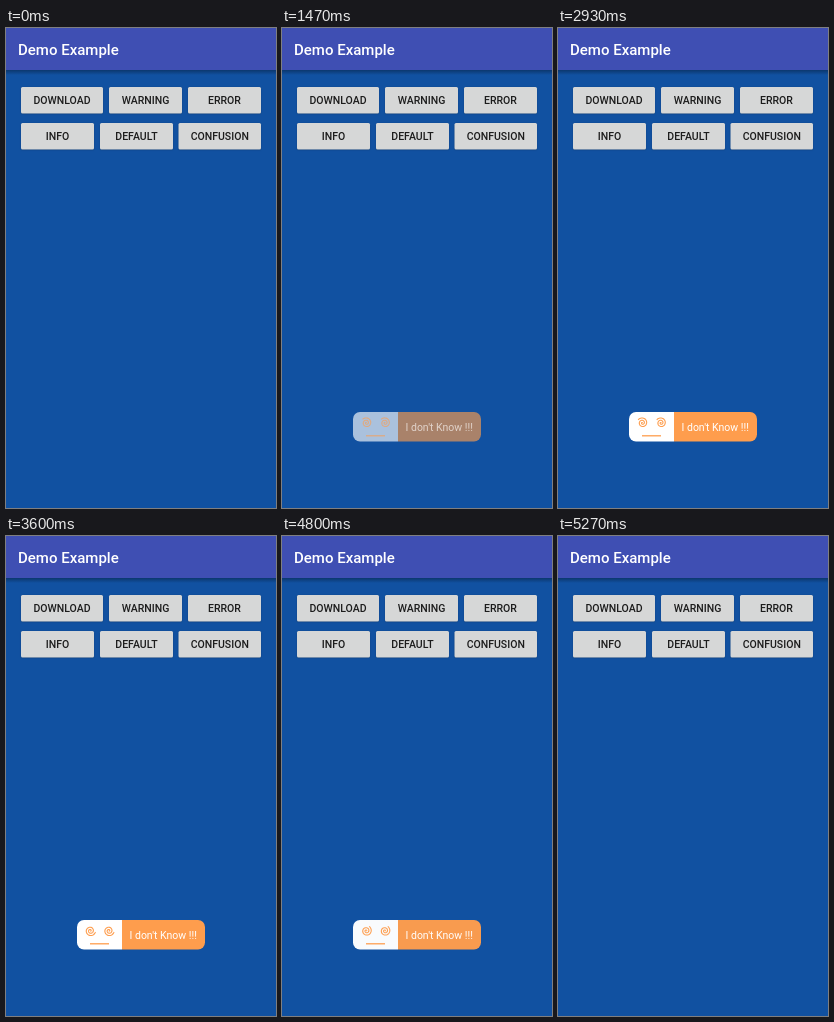
Write an HTML page with a canvas that moves like this. It is 270 px wide and 480 px high and loops after 6540 ms.

```html
<!DOCTYPE html>
<html lang="en">
<head>
<meta charset="utf-8">
<title>Demo Example</title>
<style>
  html, body { margin: 0; width: 100%; height: 100%; overflow: hidden; background: #1151a1; }
  canvas { display: block; width: 100vw; height: 100vh; }
</style>
</head>
<body>
<canvas id="stage" width="270" height="480"></canvas>
<script>
const ctx = document.getElementById('stage').getContext('2d');
const LOOP = 6540;
const STEP = 200 / 3;
const ORANGE = '#fe9d4d';
const FONT = 'Roboto, sans-serif';

const BUTTONS = [
  ['DOWNLOAD', 15, 59, 82],
  ['WARNING', 103, 59, 73],
  ['ERROR', 182, 59, 73],
  ['INFO', 15, 95, 73],
  ['DEFAULT', 94, 95, 73],
  ['CONFUSION', 172.5, 95, 82.5]
];
const BUTTON_HEIGHT = 26.5;

const clamp = v => Math.max(0, Math.min(1, v));
const progress = (t, start, duration) => clamp((t - start) / duration);

function roundRect(x, y, w, h, r) {
  ctx.beginPath();
  ctx.roundRect(x, y, w, h, r);
}

function label(text, x, y, size, weight, color, align = 'left') {
  ctx.font = `${weight} ${size}px ${FONT}`;
  ctx.fillStyle = color;
  ctx.textAlign = align;
  ctx.fillText(text, x, y);
}

function drawBackground() {
  ctx.fillStyle = '#1151a1';
  ctx.fillRect(0, 0, 270, 480);
  const shadow = ctx.createLinearGradient(0, 42, 0, 47);
  shadow.addColorStop(0, 'rgba(0,0,0,.32)');
  shadow.addColorStop(1, 'rgba(0,0,0,0)');
  ctx.fillStyle = shadow;
  ctx.fillRect(0, 42, 270, 5);
  ctx.fillStyle = '#3f4fb3';
  ctx.fillRect(0, 0, 270, 42);
  label('Demo Example', 12, 27, 15, 500, '#fff');
}

function drawButton([text, x, y, w], press) {
  ctx.save();
  ctx.shadowColor = 'rgba(0,0,0,.3)';
  ctx.shadowBlur = 1.5 + press.opacity;
  ctx.shadowOffsetY = 0.5 + press.opacity * 0.5;
  ctx.fillStyle = '#d6d7d7';
  roundRect(x, y, w, BUTTON_HEIGHT, 1.5);
  ctx.fill();
  ctx.restore();

  if (press.opacity > 0) {
    ctx.save();
    roundRect(x, y, w, BUTTON_HEIGHT, 1.5);
    ctx.clip();
    ctx.fillStyle = `rgba(0,0,0,${0.12 * press.opacity})`;
    ctx.beginPath();
    ctx.arc(x + w / 2, y + BUTTON_HEIGHT / 2, 44 * press.spread, 0, Math.PI * 2);
    ctx.fill();
    ctx.restore();
  }
  label(text, x + w / 2, y + 17, 10.5, 500, '#1c1c1c', 'center');
}

function drawSpiral(x, y, rotation) {
  const turns = 2.25 * Math.PI * 2;
  ctx.beginPath();
  for (let a = 0; a <= turns; a += 0.15) {
    const r = 5.2 * a / turns;
    const angle = rotation + turns - a;
    ctx.lineTo(x + r * Math.cos(angle), y + r * Math.sin(angle));
  }
  ctx.stroke();
}

function drawToast(t) {
  const enter = 1 - (1 - progress(t, 1265, 500)) ** 2;
  const leave = progress(t, 4725, 500) ** 2;
  const alpha = enter * (1 - leave);
  if (alpha <= 0) return;

  ctx.save();
  ctx.globalAlpha = alpha;
  ctx.fillStyle = '#fff';
  roundRect(71, 384, 45, 29.5, [7, 0, 0, 7]);
  ctx.fill();
  ctx.fillStyle = ORANGE;
  roundRect(116, 384, 83, 29.5, [0, 7, 7, 0]);
  ctx.fill();

  // The spirals turn 4 degrees per 60 Hz tick.
  const rotation = (5 + (t - 2070) * 0.24) * Math.PI / 180;
  ctx.strokeStyle = ORANGE;
  ctx.lineWidth = 1.1;
  drawSpiral(84.4, 394.8, rotation);
  drawSpiral(103, 394.8, rotation);
  ctx.lineWidth = 1.3;
  ctx.beginPath();
  ctx.moveTo(84, 407.8);
  ctx.lineTo(103, 407.8);
  ctx.stroke();
  label("I don't Know !!!", 123.5, 402.7, 10.5, 400, '#fff');
  ctx.restore();
}

function draw(now) {
  const t = Math.floor((now % LOOP + 4) / STEP) * STEP;
  const press = {
    spread: 1 - (1 - progress(t, 0, 530)) ** 2,
    opacity: progress(t, 0, 200) * (1 - progress(t, 1135, 265))
  };
  const idle = { spread: 0, opacity: 0 };

  drawBackground();
  for (const button of BUTTONS) {
    drawButton(button, button[0] === 'CONFUSION' ? press : idle);
  }
  drawToast(t);
}

const start = performance.now();
function tick() {
  draw(performance.now() - start);
  requestAnimationFrame(tick);
}
tick();
</script>
</body>
</html>
```
